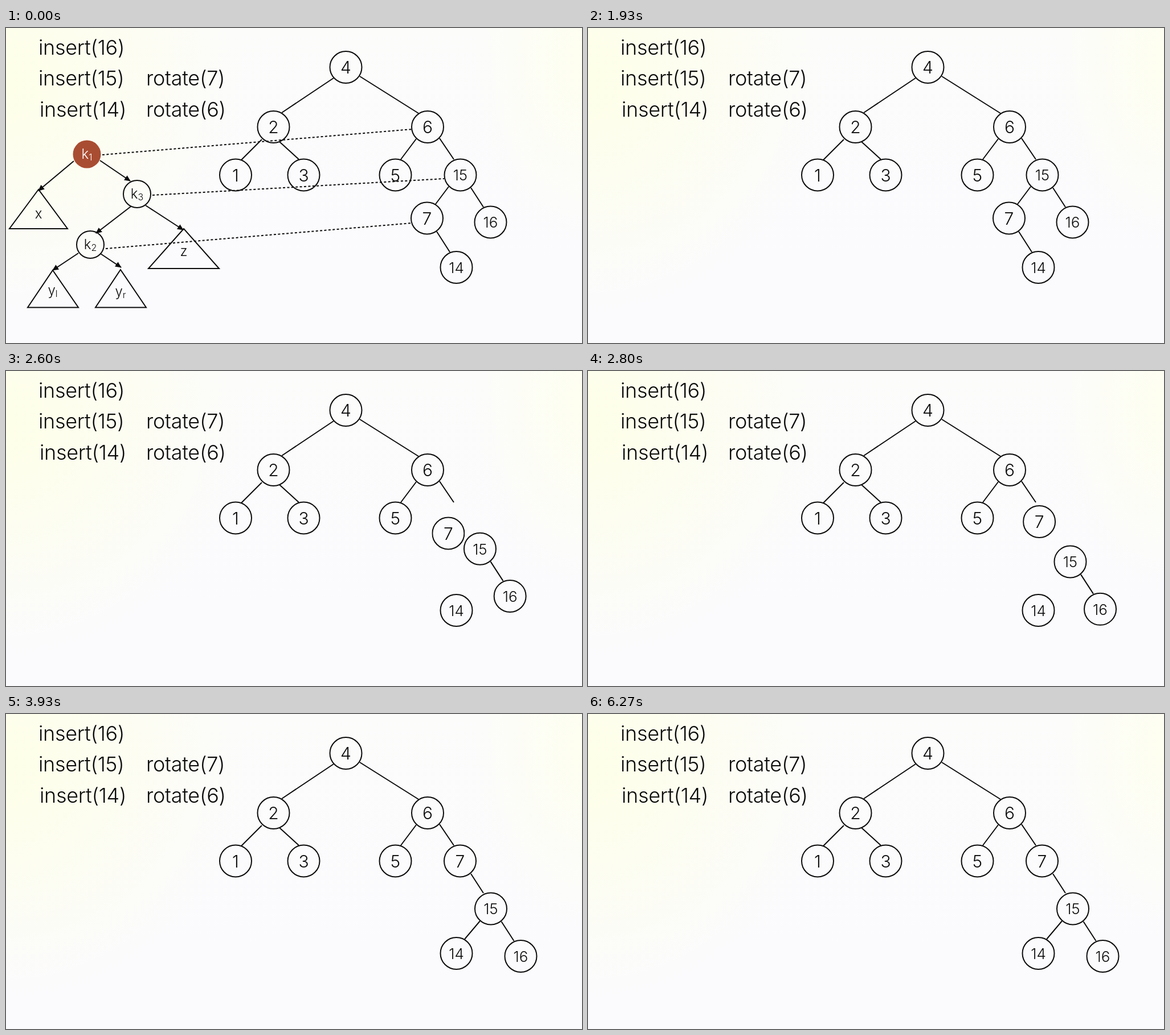
Recreate the animation shown at these times as an HTML page. Size 1011 by 554 pixels, loop 6.34 s.

```html
<!DOCTYPE html>
<html lang="en">
<head>
<meta charset="utf-8">
<title>Tree rotation</title>
<style>
  html, body { margin: 0; width: 100%; height: 100%; overflow: hidden; }
  body {
    background:
      radial-gradient(ellipse 420px 430px at 0 90px, #feffe8 0, #feffe800 100%),
      radial-gradient(ellipse 190px 330px at 1011px 60px, #fefff0 0, #fefff000 100%),
      linear-gradient(#fcfcfb, #fbfbfe 75%);
  }
  svg { display: block; width: 100%; height: 100%; }
  svg * { vector-effect: none; }
  text { font-family: Inter, "Liberation Sans", sans-serif; font-weight: 300; fill: #0c0c0c; stroke: none; }
  .shape { fill: none; stroke: #0c0c0c; stroke-width: 2; }
  .dots { stroke-dasharray: 4 3.4; }
  .call { font-size: 36px; letter-spacing: -.3px; }
  .node text, .sketch text { text-anchor: middle; }
  .root { fill: #a94d32; stroke: none; }
  .sketch .light { fill: #fff; }

  .sketch, .before, .after, .move { animation: 6340ms infinite; }
  .sketch { animation-name: dissolve; animation-timing-function: linear; }
  .before { animation-name: hide; animation-timing-function: step-end; }
  .after { animation-name: show; animation-timing-function: step-end; }
  .move { animation-name: move; animation-timing-function: cubic-bezier(.333, 0, .667, 1); }

  @keyframes dissolve { 0%, 1.1% { opacity: 1 } 9.5%, 100% { opacity: 0 } }
  @keyframes hide { 0% { opacity: 1 } 32.6%, 100% { opacity: 0 } }
  @keyframes show { 0% { opacity: 0 } 46.7%, 100% { opacity: 1 } }
  @keyframes move {
    0%, 32.6% { transform: translate(0, 0) }
    46.7%, 100% { transform: translate(var(--dx), var(--dy)) }
  }
</style>
</head>
<body>
<svg viewBox="0 0 1011 554" preserveAspectRatio="none">
  <defs>
    <marker id="tip" markerUnits="userSpaceOnUse" markerWidth="12" markerHeight="12" refX="10" refY="5" orient="auto">
      <path d="M0 0L11 5L0 10Z" fill="#0c0c0c"/>
    </marker>
  </defs>

  <g class="call">
    <text x="57" y="47">insert(16)</text>
    <text x="57" y="101">insert(15)</text>
    <text x="246" y="101">rotate(7)</text>
    <text x="59" y="156">insert(14)</text>
    <text x="246" y="156">rotate(6)</text>
  </g>

  <path class="shape" d="M575 88L484 149M621 85L724 150M449 196L413 232M480 200L514 231M720 195L693 231M761 194L786 231"/>
  <path class="shape before" d="M777 279L753 311M756 358L779 394"/>
  <path class="shape after" d="M816 281L838 315M832 364L805 396"/>

  <g id="tree"></g>

  <g class="sketch">
    <path class="shape" d="M57 284L6 353H108ZM312 353L250 423H374ZM82 426L38 491.500H127ZM201 425L157 491.500H246Z"/>
    <g id="arrows"></g>
    <path class="shape dots" d="M169 223L713 178M257 294L769 265M175 388L713 343"/>
    <circle class="root" cx="142" cy="222" r="24.500"/>
    <circle class="shape" cx="230" cy="292" r="24"/>
    <circle class="shape" cx="148" cy="381" r="24"/>
    <g id="labels"></g>
  </g>
</svg>
<script>
  const get = id => document.getElementById(id);

  const node = (label, x, y, dx = 0, dy = 0) => {
    const size = label > 9 ? 26 : 30;
    const edge = label === 15 ? '<path class="shape" d="M816 281L838 315"/>' : '';
    return `<g class="node ${dx ? 'move' : ''}" style="--dx:${dx}px;--dy:${dy}px">${edge}
      <circle class="shape" cx="${x}" cy="${y}" r="28"/>
      <text x="${x}" y="${y + size * .364 + .5}" font-size="${size}">${label}</text></g>`;
  };
  get('tree').innerHTML = [
    [4, 596.5, 69], [2, 469.5, 174], [6, 740, 174], [1, 403, 258.500], [3, 522.5, 258.500],
    [5, 683.5, 258.500], [14, 790.5, 421], [7, 739, 334.5, 58, -76],
    [15, 797.5, 258.500, 53.5, 84], [16, 850.5, 341.5, 53, 84.5]
  ].map(n => node(...n)).join('');

  get('arrows').innerHTML = [
    'M119 234L57 286', 'M165 233L218 269', 'M219 314L158 361',
    'M245 312L311 355', 'M127 396L82 426', 'M166 397L202 421'
  ].map(d => `<path class="shape" d="${d}" marker-end="url(#tip)"/>`).join('');

  const label = (text, sub, x, y, style = '') =>
    `<text class="${style}" x="${x}" y="${y}" font-size="24">${text}<tspan font-size="16" dy="3">${sub}</tspan></text>`;
  get('labels').innerHTML = [
    ['k', '1', 142, 230, 'light'], ['k', '3', 230, 300], ['k', '2', 148, 389],
    ['x', '', 57, 335], ['z', '', 312, 401], ['y', 'l', 82, 470], ['y', 'r', 201, 472]
  ].map(l => label(...l)).join('');
</script>
</body>
</html>
```
